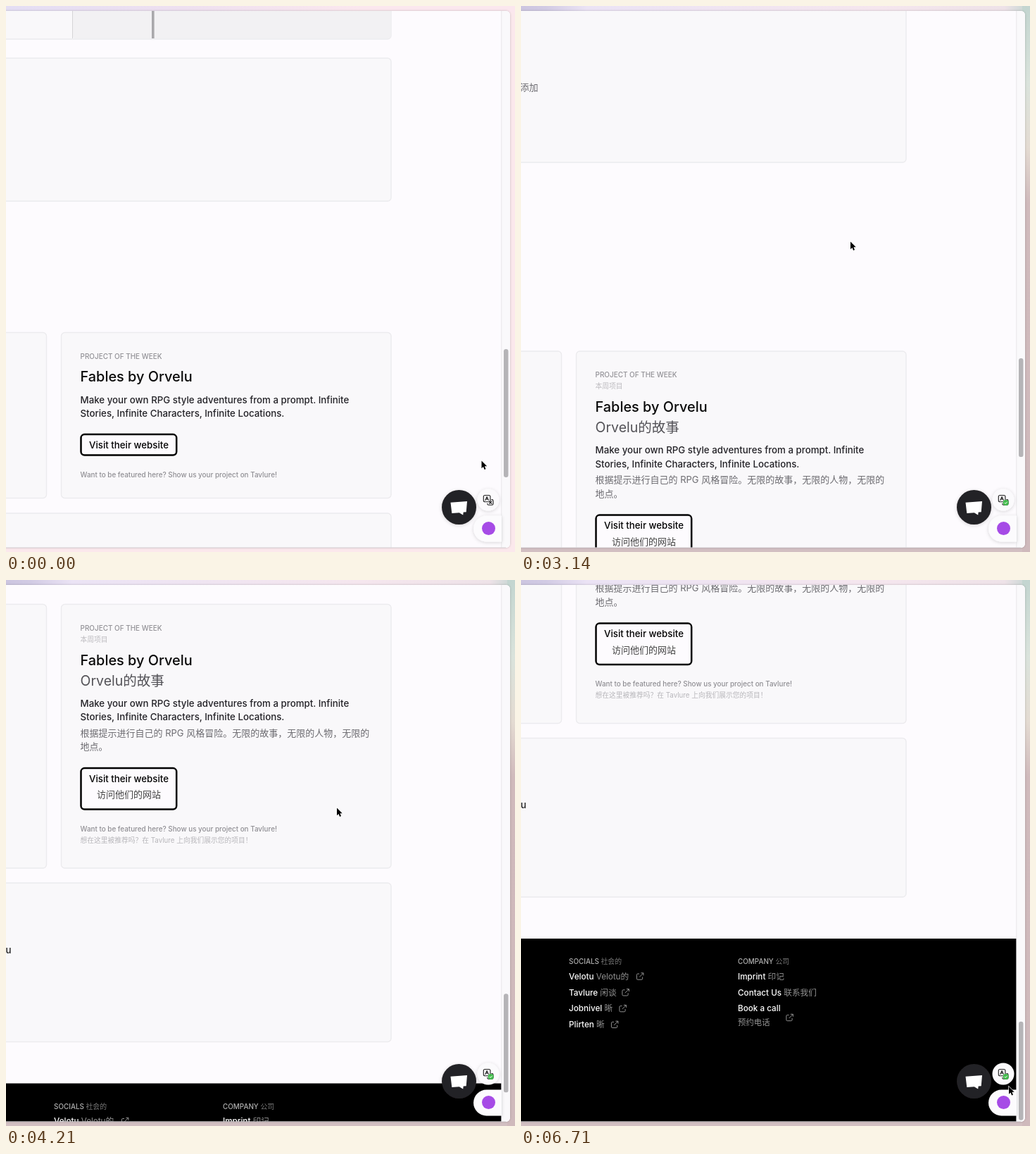
Recreate the animation shown at these times as an HTML page. Size 723 px wide and 775 px high, loop 6780 ms.

```html
<!DOCTYPE html>
<html lang="zh-CN">
<head>
<meta charset="utf-8">
<title>Page translation</title>
<style>
  html, body { margin: 0; width: 100%; height: 100%; overflow: hidden; }
  svg { display: block; width: 723px; height: 775px; }
  text { font-family: Inter, "Noto Sans CJK SC", "Noto Sans CJK", sans-serif; white-space: pre; }
</style>
</head>
<body>
<svg id="stage" viewBox="0 0 723 775">
  <defs>
    <clipPath id="view"><path d="M0 7H704V769H0Z"/></clipPath>
    <linearGradient id="dawn">
      <stop offset="0" stop-color="#e4def4"/><stop offset=".35" stop-color="#eee0f0"/><stop offset=".7" stop-color="#fbe7ee"/>
    </linearGradient>
    <linearGradient id="dusk">
      <stop offset="0" stop-color="#ccc5e0"/><stop offset=".05" stop-color="#d2cbe4"/><stop offset=".13" stop-color="#ebe3f5"/>
      <stop offset=".7" stop-color="#f5e6ee"/><stop offset=".95" stop-color="#eee2e8"/><stop offset="1" stop-color="#c3d5d0"/>
    </linearGradient>
    <linearGradient id="duskSide" x2="0" y2="1">
      <stop offset="0" stop-color="#c3d5d0"/><stop offset=".14" stop-color="#dae3dc"/><stop offset=".26" stop-color="#e4dbd2"/>
      <stop offset=".36" stop-color="#d0babc"/><stop offset="1" stop-color="#cfb9bc"/>
    </linearGradient>
    <filter id="soft" x="-40%" y="-40%" width="180%" height="180%">
      <feDropShadow dx="0" dy="1" stdDeviation="2.5" flood-opacity=".16"/>
    </filter>
    <filter id="edge"><feDropShadow dx="0" dy="0" stdDeviation="1.5" flood-opacity=".22"/></filter>
  </defs>

  <rect width="723" height="775" fill="#fbe8ec"/>
  <rect width="723" height="9" fill="url(#dawn)"/>
  <g id="night">
    <rect width="723" height="775" fill="#d2bfc2"/>
    <rect width="723" height="9" fill="url(#dusk)"/>
    <rect x="712" width="11" height="775" fill="url(#duskSide)"/>
  </g>

  <rect x="-30" y="7" width="746" height="762" rx="6" fill="#fdfbfe" filter="url(#edge)"/>
  <g clip-path="url(#view)">
    <g id="plain"></g>
    <g id="translated"></g>
  </g>
  <path d="M704 7H710A6 6 0 0 1 716 13V763A6 6 0 0 1 710 769H704Z" fill="#faf9fb"/>
  <path d="M703.8 7V769" stroke="#e7e6e9"/>
  <path d="M0 768.7H710" stroke="#d9d5d9" stroke-width=".8"/>
  <rect id="thumb" x="707" width="6.5" rx="3.2" fill="#b5b4b7"/>

  <circle cx="643.5" cy="711.5" r="24.5" fill="#242225" filter="url(#soft)"/>
  <path d="M631.5 704.7L655 703L653.7 718.2L649.7 718.5L649.2 722.5L643.8 719.3L633.3 720Z" fill="#fff"/>

  <path d="M704 723.5H682.5A18.5 18.5 0 0 0 682.5 760.5H704Z" fill="#fcfbfd" filter="url(#soft)"/>
  <circle cx="685.5" cy="741.5" r="9.5" fill="#a64be6"/>

  <rect id="panel" x="669.5" width="31" rx="15.5" fill="#fbfafc" filter="url(#soft)"/>
  <g id="hover">
    <circle cx="685" cy="701" r="14" fill="#e9e1fb"/>
    <path d="M681.3 665.8H688.7L692.5 672L688.7 678.2H681.3L677.5 672Z" fill="none" stroke="#222" stroke-width="1.4" stroke-linejoin="round"/>
    <circle cx="685" cy="672" r="2.1" fill="none" stroke="#222" stroke-width="1.3"/>
  </g>
  <g id="lang" fill="none" stroke-width="1.15" stroke-linecap="round" stroke-linejoin="round">
    <rect x="678.3" y="694.5" width="9.6" height="9.2" rx="2"/>
    <path d="M680.9 701.4L683.1 696.6L685.3 701.4M681.7 699.8H684.5"/>
    <path d="M689.8 700.6H690.3Q692 700.6 692 702.4V706.6Q692 708.2 690.3 708.2H685.6Q683.8 708.2 683.8 706.4M686.6 706.3L689.8 703M686.8 703.6L689.8 706.3"/>
  </g>
  <g id="done">
    <circle cx="688.7" cy="705" r="4" fill="#43bd4d"/>
    <path d="M686.8 705L688.2 706.4L690.7 703.8" fill="none" stroke="#fff"/>
  </g>
  <g id="badge">
    <rect x="695.5" y="713" width="11" height="11" rx="1.5" fill="#000"/>
    <text x="701" y="721.5" font-size="8" font-weight="700" fill="#fff" text-anchor="middle">A</text>
  </g>

  <g id="arrow">
    <path transform="scale(.82)" d="M0 0V13.2L3 10.4L5 15.2L7.3 14.2L5.3 9.5H9.4Z" stroke="#fff" stroke-width="1.6" paint-order="stroke"/>
  </g>
  <g id="hand">
    <path d="M2.5 1.2C2.5-.4 4.8-.4 4.8 1.2V6C5 4.7 7 4.8 7.1 6.2C7.4 5.2 9.1 5.4 9.2 6.6C9.6 5.8 11 6.1 11 7.3V11C11 13 10 13.5 9.6 15H4.5C4 13.3 1.5 11.5 .3 9.3C-.3 8.1 1.2 7.3 2.1 8.5L2.5 9.1Z" fill="#fff" stroke="#111" stroke-width="1.1" stroke-linejoin="round"/>
    <path d="M5.2 10.5V12.8M7.1 10.5V12.8M9 10.5V12.8" stroke="#111" stroke-width=".7"/>
  </g>
</svg>

<script>
const $ = id => document.getElementById(id);
const LOOP = 6780, TICK = 1000 / 14, TRANSLATED = 2430;

// Vertical positions inside the page are relative to the top of the project card.
const text = (x, mid, size, fill, str, weight = 500, extra = '') =>
  `<text x="${x}" y="${mid + size * .36}" font-size="${size}" fill="${fill}" font-weight="${weight}" ${extra}>${str}</text>`;
const zh = (x, mid, size, fill, str, extra) => text(x, mid, size, fill, str, 400, extra);
const card = (x, y, w, h) =>
  `<rect x="${x}" y="${y + .5}" width="${w}" height="${h}" rx="5" fill="#f9f8fa" stroke="#ecebee" stroke-width="1.4"/>`;
const button = (y, h) =>
  `<rect x="106.5" y="${y + 1.1}" width="135.7" height="${h - 2.6}" rx="5" fill="#fdfbfe" stroke="#000" stroke-width="2.5"/>`;
const duo = (x, mid, size, a, b, fillA, fillB) =>
  text(x, mid, size, fillA, `${a} <tspan fill="${fillB}" font-weight="400">${b}</tspan>`);
const external = (x, y) =>
  `<path transform="translate(${x} ${y})" d="M-1-3.5H-3.2Q-4.6-3.5-4.6-2.1V3.3Q-4.6 4.7-3.2 4.7H2.2Q3.6 4.7 3.6 3.3V1M1.4-4.7H4.9V-1.2M4.7-4.5L-.8 1" fill="none" stroke="#929292" stroke-width="1"/>`;

const LEFT = -30, WIDE = 577;

function cards(height, nextTop) {
  return card(LEFT, 0, 87.5, height) + card(78.5, 0, 468.5, height) +
    card(LEFT, nextTop, WIDE, 225.5) + text(-.5, nextTop + 95.5, 13.3, '#222', 'u');
}

function copy([label, title, line1, line2, cta, note]) {
  return text(105.5, label, 9.95, '#929196', 'PROJECT OF THE WEEK') +
    text(105.5, title, 19.9, '#0a0a0a', 'Fables by Orvelu') +
    text(105.5, line1, 13.3, '#232227', 'Make your own RPG style adventures from a prompt. Infinite') +
    text(105.5, line2, 13.3, '#232227', 'Stories, Infinite Characters, Infinite Locations.') +
    text(174.5, cta, 13.25, '#000', 'Visit their website', 500, 'text-anchor="middle"') +
    text(105.5, note, 9.9, '#8f8e93', 'Want to be featured here? Show us your project on Tavlure!');
}

$('plain').innerHTML =
  card(LEFT, -600, WIDE, 183.5) +
  '<rect x="94.5" y="-600" width="452" height="183" rx="4" fill="#f2f1f3"/>' +
  '<path d="M94.5-600V-417" stroke="#d5d4d7"/>' +
  '<path d="M208.8-600V-417" stroke="#a9a8ab" stroke-width="3.6"/>' +
  card(LEFT, -389.5, WIDE, 203) +
  cards(235, 256.5) + button(144, 32) + copy([34, 63, 96, 115, 160.5, 202.5]);

const FOOT = 680.5;
const socials = [['Velotu', 'Velotu的', 169], ['Tavlure', '闲谈', 148.5], ['Jobnivel', '晰', 144.5], ['Plirten', '晰', 133]];
$('translated').innerHTML =
  card(LEFT, -600, WIDE, 332) + zh(-1.5, -374.5, 13, '#6c6b70', '添加') +
  cards(374.5, 395.5) + button(232, 61) + copy([34, 79.5, 141, 160.5, 248, 319]) +
  zh(105.5, 50, 9.75, '#bcbbbf', '本周项目') +
  zh(105.5, 108.5, 19.5, '#535257', 'Orvelu的故事') +
  zh(105.5, 183, 13, '#6c6b70', '根据提示进行自己的 RPG 风格冒险。无限的故事\uFF0C无限的人物\uFF0C无限的') +
  zh(105.5, 202.5, 13, '#6c6b70', '地点。') +
  zh(174.5, 270.5, 13, '#444', '访问他们的网站', 'text-anchor="middle"') +
  zh(105.5, 335, 9.75, '#b7b6ba', '想在这里被推荐吗\uFF1F在 Tavlure 上向我们展示您的项目\uFF01') +
  `<rect x="0" y="${FOOT}" width="704" height="400" fill="#000"/>` +
  duo(68, FOOT + 32.5, 9.9, 'SOCIALS', '社会的', '#b0b0b0', '#777') +
  duo(308, FOOT + 32.5, 9.9, 'COMPANY', '公司', '#b0b0b0', '#777') +
  socials.map(([a, b, x], i) => {
    const y = FOOT + 53.5 + i * 22.8;
    return duo(68, y, 11.7, a, b, '#fff', '#929292') + external(x, y);
  }).join('') +
  duo(308, FOOT + 53.5, 11.7, 'Imprint', '印记', '#fff', '#929292') +
  duo(308, FOOT + 76.3, 11.7, 'Contact Us', '联系我们', '#fff', '#929292') +
  text(308, FOOT + 99, 11.7, '#fff', 'Book a call') +
  zh(308, FOOT + 119, 11.4, '#929292', '预约电话') + external(381.5, FOOT + 112);

// time, card top
const scroll = [[0, 463], [300, 463], [400, 448], [620, 360], [800, 338], [TRANSLATED - 1, 338], [TRANSLATED, 419],
  [2790, 419], [3140, 490], [3300, 455], [4000, 88], [4500, -38.5], [4928, -171.5]];
// time, x, y
const path = [[0, 675.5, 645.5], [70, 672, 611], [650, 672, 611], [1000, 680, 733], [1210, 680, 695], [1360, 680, 695],
  [1500, 684, 696.5], [2430, 684, 696.5], [2790, 468, 334.5], [3140, 468, 334.5], [4000, 470, 320], [4500, 470, 328],
  [4928, 471, 386], [5210, 552, 203], [5360, 552, 203], [5500, 712, 586], [5570, 726, 640], [5780, 726, 719],
  [5785, 717, 719], [6000, 717, 719], [6500, 693, 719]];

function at(keys, t) {
  const i = keys.findIndex(k => k[0] > t);
  if (i < 0) return keys[keys.length - 1].slice(1);
  const a = keys[i - 1], b = keys[i], p = (t - a[0]) / (b[0] - a[0]);
  return a.slice(1).map((v, n) => v + (b[n + 1] - v) * p);
}
const ramp = (t, a, b) => Math.min(1, Math.max(0, (t - a) / (b - a)));
const show = (id, on) => $(id).setAttribute('visibility', on ? 'visible' : 'hidden');
const move = (id, x, y) => $(id).setAttribute('transform', `translate(${x} ${y})`);

function draw(t) {
  const after = t >= TRANSLATED;
  const top = Math.round(at(scroll, t)[0] * 2) / 2;
  show('plain', !after);
  show('translated', after);
  move('plain', 0, top);
  move('translated', 0, top);
  $('thumb').setAttribute('y', after ? 500 + (490 - top) / 5.22 : 487 + (463 - top) / 4.17);
  $('thumb').setAttribute('height', after ? 140 : 182);
  $('night').setAttribute('opacity', ramp(t, 1360, 1900));

  const open = ramp(t, 860, 1000) * (1 - ramp(t, 2500, 2640));
  $('panel').setAttribute('y', 685.5 - 29 * open);
  $('panel').setAttribute('height', 31 + 29 * open);
  $('hover').setAttribute('opacity', open);
  $('lang').setAttribute('stroke', open > .5 ? '#6f45d8' : '#222');
  show('done', after);
  show('badge', t >= 1360 && t < 2500);

  const [x, y] = at(path, t), pointing = t >= 900 && t < 2480;
  show('hand', pointing);
  show('arrow', !pointing);
  move('hand', x, y);
  move('arrow', x, y);
}

const start = performance.now();
function frame() {
  const t = (performance.now() - start) % LOOP;
  draw(Math.floor((t + 6) / TICK) * TICK);
  requestAnimationFrame(frame);
}
frame();
</script>
</body>
</html>
```
